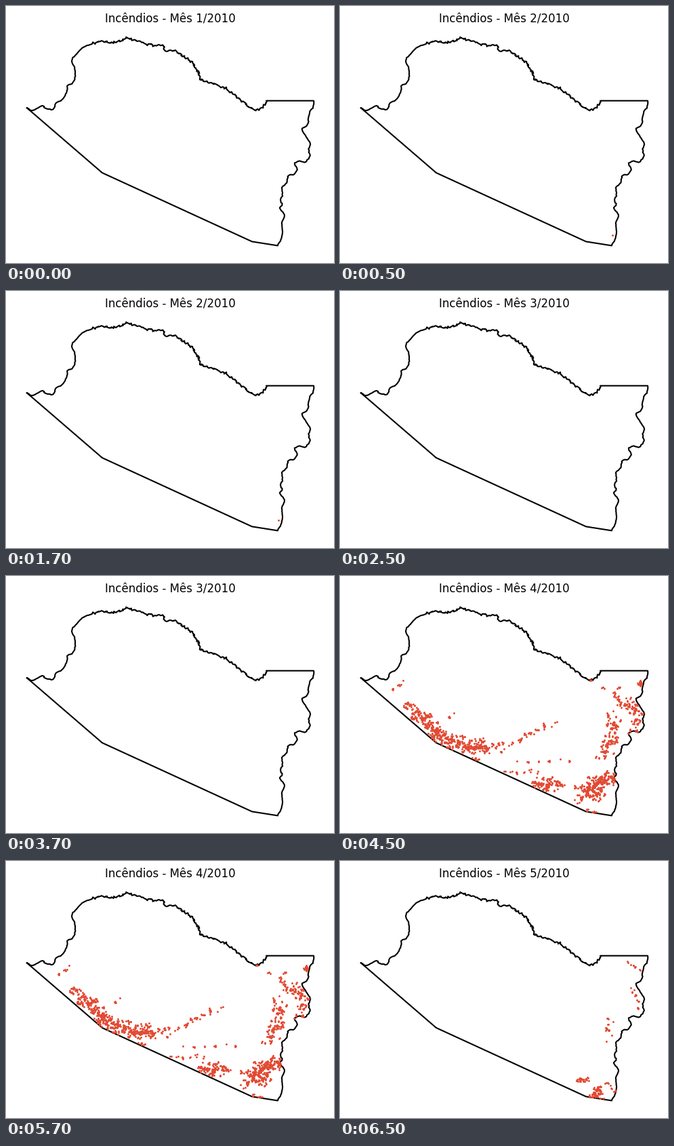
A matplotlib script that plays this animation: 484 px wide and 379 px high, repeating every 8000 ms.

```python
import numpy as np
import matplotlib.pyplot as plt
from matplotlib.animation import FuncAnimation
from matplotlib.path import Path

W, H, DPI = 484, 379, 100
INTERVAL = 500
FIRE = "#e24a33"

plt.rcParams["font.family"] = "DejaVu Sans"

# Key points of the border, clockwise from the western tip
WEST = [
    (31, 150.4), (39, 154), (54, 147), (58, 151), (70, 152), (74, 143),
    (83, 138), (90, 126), (91, 117), (98, 114), (102, 105), (101, 91),
    (97, 80), (103, 72), (114, 61), (127, 56),
]
NORTH = [
    (127, 56), (141, 52), (151, 54), (166, 52), (180, 48), (198, 53),
    (216, 58), (230, 58), (235, 65), (250, 67), (270, 80), (281, 93),
    (288, 108), (306, 115), (328, 124), (348, 140), (366, 153), (381, 148),
    (384, 139.7),
]
EAST = [
    (454, 139.7), (454, 148), (449, 155), (446, 165), (445, 175), (437, 182),
    (443, 193), (449, 204), (447, 212), (448, 222), (441, 230), (432, 229),
    (426, 233), (430, 241), (424, 248), (417, 250), (414, 260), (407, 268),
    (408, 277), (405, 288), (408, 293), (404, 299), (411, 307), (407, 320),
    (408, 337), (401, 353.4),
]
COAST = [(363, 347.4), (142, 246), (31, 150.4)]

# Belts of fires: key points, spread, number of clumps
APRIL = [
    ([(78, 168), (92, 156)], 1, 3),
    ([(99, 193), (125, 209), (145, 234)], 5, 75),
    ([(140, 236), (175, 248), (224, 250)], 6, 125),
    ([(160, 208), (168, 204)], 1, 3),
    ([(190, 268), (204, 269)], 1, 5),
    ([(235, 255), (260, 241), (285, 228), (314, 217)], 3, 20),
    ([(240, 289), (292, 289)], 1, 6),
    ([(262, 273), (340, 272)], 1, 6),
    ([(283, 307), (325, 307)], 5, 45),
    ([(350, 322), (385, 316)], 7, 60),
    ([(374, 305), (406, 298)], 6, 60),
    ([(364, 344), (386, 350)], 2, 4),
    ([(371, 155), (386, 166), (411, 163)], 1, 3),
    ([(441, 157), (445, 160)], 1, 6),
    ([(408, 182), (440, 196)], 5, 34),
    ([(405, 205), (402, 235), (390, 263)], 6, 54),
    ([(446, 205), (430, 229)], 4, 20),
]
MAY = [
    ([(425, 150), (444, 160)], 1, 4),
    ([(432, 188), (438, 215)], 2, 5),
    ([(403, 235), (392, 264)], 5, 8),
    ([(350, 323), (367, 321)], 1, 12),
    ([(371, 344), (385, 337)], 3, 24),
    ([(392, 327), (404, 338)], 1, 4),
    ([(374, 348), (387, 351)], 1, 5),
]


def along(points, n):
    """Evenly spaced points on a polyline."""
    p = np.array(points, float)
    s = np.r_[0, np.cumsum(np.hypot(*np.diff(p, axis=0).T))]
    t = np.linspace(0, s[-1], n)
    return np.column_stack([np.interp(t, s, axis) for axis in p.T])


def curve(points, steps=12):
    """Catmull-Rom curve through the key points."""
    p = np.array(points, float)
    m = np.gradient(p, axis=0)
    t = np.linspace(0, 1, steps, endpoint=False)[None, :, None]
    a, b, ma, mb = (v[:, None] for v in (p[:-1], p[1:], m[:-1], m[1:]))
    h = 3 * t**2 - 2 * t**3
    c = a + (b - a) * h + ma * t * (1 - t)**2 - mb * t**2 * (1 - t)
    return np.vstack([c.reshape(-1, 2), p[-1]])


def river(points, rough, step, seed):
    """Curve with seeded meanders and fixed ends."""
    line = curve(points)
    length = np.hypot(*np.diff(line, axis=0).T).sum()
    line = along(line, int(length / step))
    noise = np.random.default_rng(seed).normal(0, rough, line.shape)
    noise[[0, -1]] = 0
    return line + noise


def burn(belts, seed):
    """Scatter small clumps of dots about each belt, inside the border."""
    rng = np.random.default_rng(seed)
    dots = []
    for points, spread, n in belts:
        for centre in along(points, n):
            centre = centre + np.clip(rng.normal(size=2), -1.8, 1.8) * spread
            dots.append(centre + rng.normal(0, 1.3, (rng.integers(1, 5), 2)))
    dots = np.vstack(dots)
    return dots[region.contains_points(dots)]


border = np.vstack([
    river(WEST, 0.3, 2.5, 1), river(NORTH, 0.9, 1.6, 2),
    river(EAST, 0.4, 2.5, 3), COAST,
])
region = Path(border)
none = np.empty((0, 2))
fires = {1: none, 2: [(402, 338)], 3: none, 4: burn(APRIL, 4), 5: burn(MAY, 5)}

fig = plt.figure(figsize=(W / DPI, H / DPI), dpi=DPI, facecolor="white")
ax = fig.add_axes([0, 0, 1, 1])
ax.set(xlim=(0, W), ylim=(H, 0))
ax.axis("off")
ax.plot(*border.T, color="black", lw=1.5, solid_joinstyle="round")
dots = ax.scatter([], [], s=1.2, lw=1, color=FIRE, zorder=3)
title = ax.text(W / 2, 24, "", fontsize=12, ha="center", va="baseline")


def update(i):
    month = 1 + (i + 3) // 4
    title.set_text(f"Incêndios - Mês {month}/2010")
    dots.set_offsets(fires[month])
    return dots, title


anim = FuncAnimation(fig, update, frames=16, interval=INTERVAL, repeat=True)
plt.show()
```
